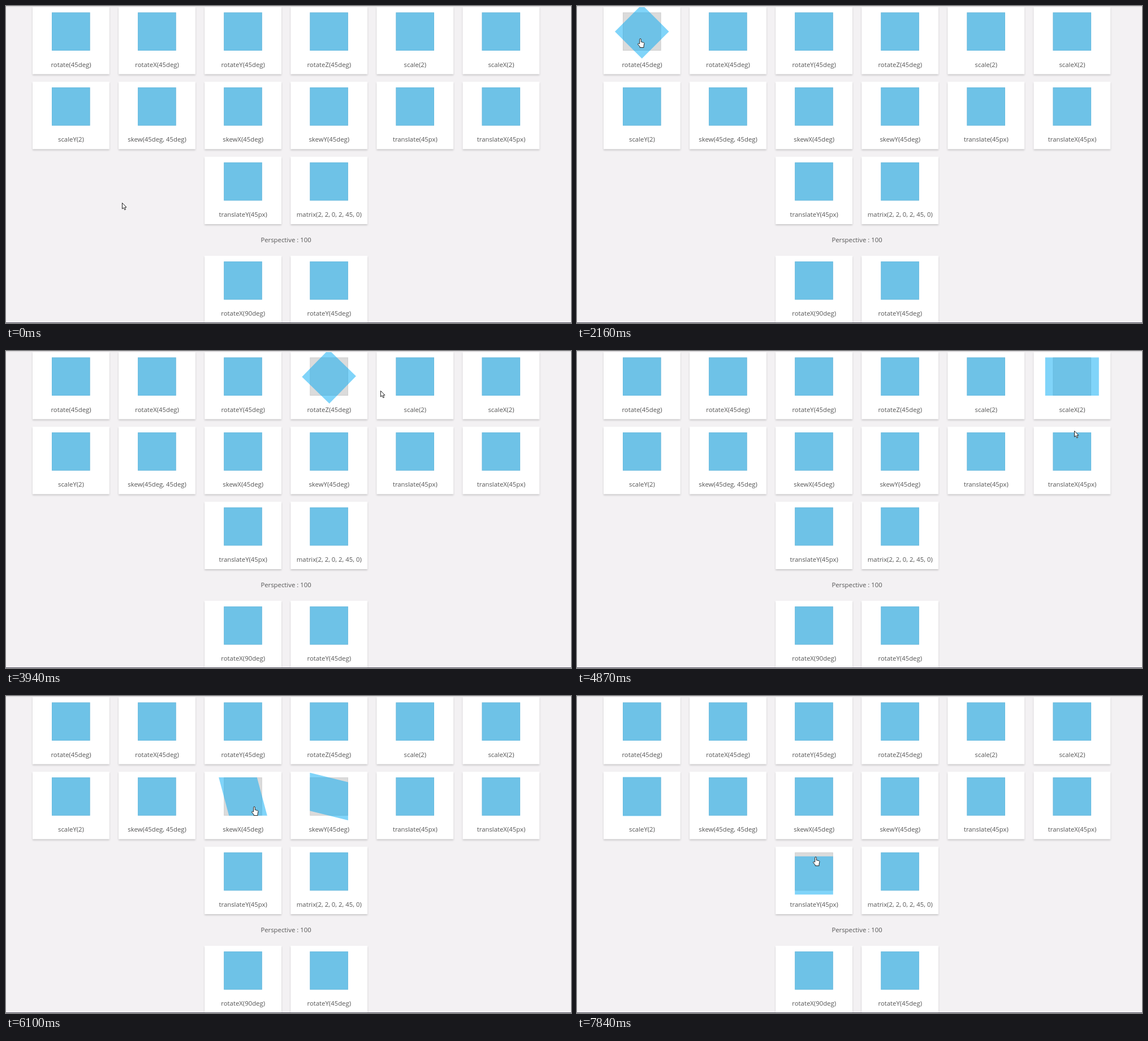
Recreate the animation shown at these times as an HTML page. Size 999 by 561 pixels, loop 7.99 s.

```html
<!DOCTYPE html>
<html lang="en">
<head>
<meta charset="utf-8">
<title>CSS transforms</title>
<style>
  html, body { margin: 0; width: 100%; height: 100%; overflow: hidden; background: #f3f1f3; }
  svg { display: block; width: 999px; height: 561px; }
  text { font: 11.35px "Open Sans", "Noto Sans", sans-serif; fill: #555; text-anchor: middle; }
  .card { fill: #fff; filter: drop-shadow(0 2px 1.5px rgba(0, 0, 0, .17)); }
  .slot { fill: #dbdbdb; }
  .edge { fill: none; stroke: rgba(0, 0, 0, .06); }
  .box { fill: rgba(3, 169, 244, .5); transform-box: fill-box; transform-origin: center; }
  #cursor path { fill: #fff; stroke: #222; stroke-linejoin: round; }
</style>
</head>
<body>
<svg viewBox="0 0 999 561">
  <g id="cards"></g>
  <g id="boxes"></g>
  <text x="495" y="418">Perspective : 100</text>
  <rect width="999" height="1" fill="#d8d6d8"/>
  <rect y="1" width="999" height="1" fill="#e8e6e8"/>
  <rect y="560" width="999" height="1" fill="#504e5c"/>
  <g id="cursor">
    <path id="arrow" d="M.5 .5V11L3 8.8 4.8 12.8 6.6 12 4.9 8.2H8Z"/>
    <path id="hand" d="M-1.3 9V1.2a1.3 1.3 0 0 1 2.6 0V5.5l4.2 1c1.2.3 1.6 1 1.4 2.2L6 13V15.5H-.8V14L-4.2 10c-.8-1.2.6-2.2 1.6-1.4z"/>
  </g>
</svg>
<script>
const LOOP = 7990, EASE_MS = 300;
const ZOOM = .68, SIZE = 67.6, PITCH = 152.1;

const rows = [
  [1.3, 'rotate(45deg)', 'rotateX(45deg)', 'rotateY(45deg)', 'rotateZ(45deg)', 'scale(2)', 'scaleX(2)'],
  [134, 'scaleY(2)', 'skew(45deg, 45deg)', 'skewX(45deg)', 'skewY(45deg)', 'translate(45px)', 'translateX(45px)'],
  [266.7, 'translateY(45px)', 'matrix(2, 2, 0, 2, 45, 0)'],
  [442, 'rotateX(90deg)', 'rotateY(45deg)']
];

// pointer path: time, x, y
const path = [
  [10, 205, 348], [280, 215, 355], [1000, 215, 355], [1650, 160, 140],
  [1800, 130, 79], [2040, 112, 58], [2580, 112, 58], [3530, 453, 72],
  [3620, 537, 68], [3930, 604, 69], [3940, 662, 70], [4320, 757, 62],
  [4497, 842, 50], [4767, 880, 79], [4870, 879, 141], [5250, 841, 196],
  [5350, 757, 202], [5670, 690, 206], [5680, 575, 207], [5980, 537, 204],
  [6034, 453, 198], [6100, 439, 196], [6710, 301, 196], [7060, 233, 194],
  [7220, 149, 191], [7600, 132, 212], [7788, 385, 277], [7840, 422, 285], [LOOP, 422, 285]
];

const byId = id => document.getElementById(id);
const boxes = [];

function add(parent, tag, attrs, text = '') {
  const el = document.createElementNS('http://www.w3.org/2000/svg', tag);
  for (const k in attrs) el.setAttribute(k, attrs[k]);
  el.textContent = text;
  return parent.appendChild(el);
}

function addCard(label, left, top) {
  const cards = byId('cards');
  const x = left + 34, y = top + 10.1;
  const square = { x, y, width: SIZE, height: SIZE };
  add(cards, 'rect', { class: 'card', x: left, y: top, width: 135.8, height: 119.3 });
  add(cards, 'rect', { class: 'slot', ...square });
  add(cards, 'rect', { class: 'edge', x: x + .5, y: y + .5, width: SIZE - 1, height: SIZE - 1 });
  add(cards, 'text', { x: left + 68, y: top + 106.3 }, label);
  const el = add(byId('boxes'), 'rect', { class: 'box', ...square });
  boxes.push({ el, label, x, y, changes: [] });
}

for (const [top, ...labels] of rows) {
  const left = 47 + PITCH * (6 - labels.length) / 2;
  labels.forEach((label, i) => addCard(label, left + PITCH * i, top));
}

const lerp = (a, b, k) => a + (b - a) * k;

function pointer(t) {
  const i = Math.max(1, path.findIndex(p => p[0] > t));
  const [t0, x0, y0] = path[i - 1], [t1, x1, y1] = path[i];
  const k = Math.max(0, (t - t0) / (t1 - t0));
  return [lerp(x0, x1, k), lerp(y0, y1, k)];
}

const inside = (b, [x, y]) => x >= b.x && x < b.x + SIZE && y >= b.y && y < b.y + SIZE;

// the CSS "ease" curve, solved by bisection
function ease(x) {
  if (x >= 1) return 1;
  const bezier = (s, a, b) => 3 * a * s * (1 - s) ** 2 + 3 * b * s * s * (1 - s) + s ** 3;
  let lo = 0, hi = 1;
  for (let i = 0; i < 20; i++) {
    const mid = (lo + hi) / 2;
    if (bezier(mid, .25, .25) < x) lo = mid; else hi = mid;
  }
  return bezier(lo, .1, 1);
}

function progress(box, t) {
  const c = box.changes.filter(c => c.t <= t).pop();
  return c ? lerp(c.from, c.to, ease((t - c.t) / EASE_MS)) : 0;
}

// walk the pointer once to find when each box gains or loses hover
for (let t = 0; t < LOOP; t++) {
  const at = pointer(t);
  for (const box of boxes) {
    const over = inside(box, at);
    if (over !== !!box.over) box.changes.push({ t, from: progress(box, t), to: +over });
    box.over = over;
  }
}

// the label's own transform, applied in part
function pose(label, p) {
  if (!p) return 'none';
  const squash = Math.cos(Math.PI / 4 * p);
  if (label.startsWith('rotateX')) return `scaleY(${squash})`;
  if (label.startsWith('rotateY')) return `scaleX(${squash})`;
  return label.replace(/\d+/g, n =>
    label.startsWith('scale') ? lerp(1, n, p) :
    label.startsWith('translate') ? n * p * ZOOM : n * p);
}

// the picture steps at alternating gaps of 150 and 120 ms
function stepTime(t) {
  const rest = t % 270;
  return t - rest + (rest < 150 ? 0 : 150) + 10;
}

function draw(now) {
  const t = stepTime(now % LOOP);
  const at = pointer(t);
  const over = boxes.some(b => inside(b, at));
  for (const b of boxes) b.el.style.transform = pose(b.label, progress(b, t));
  byId('cursor').setAttribute('transform', `translate(${at.map(Math.round)})`);
  byId('arrow').style.display = over ? 'none' : '';
  byId('hand').style.display = over ? '' : 'none';
}

let start;
function tick(now) {
  start ??= now;
  draw(Math.max(0, now - start));
  requestAnimationFrame(tick);
}
draw(0);
requestAnimationFrame(tick);
</script>
</body>
</html>
```
